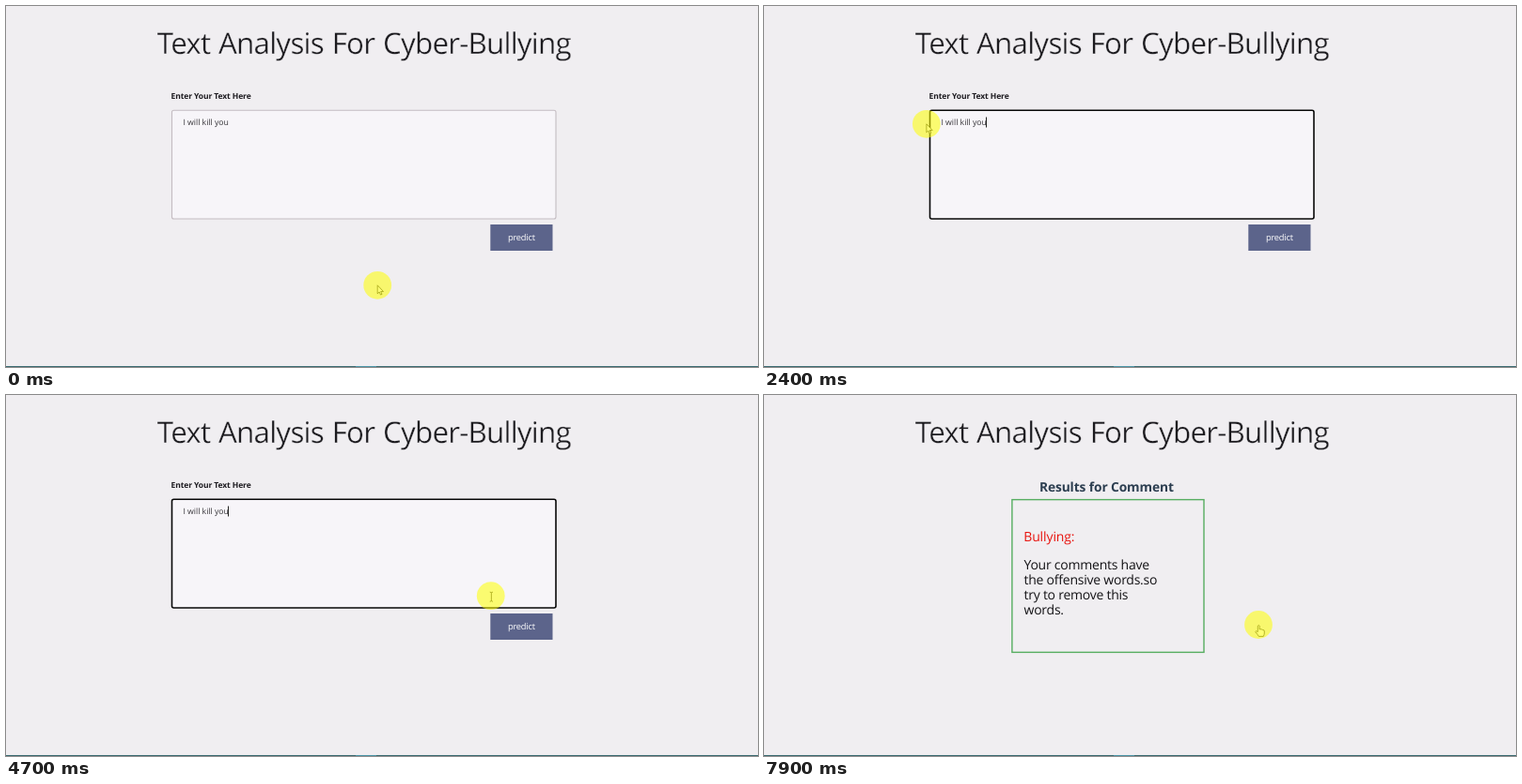
Animation, 800 px wide and 385 px high, one loop 8 s. Source, as an HTML page:

```html
<!DOCTYPE html>
<html lang="en">
<head>
<meta charset="utf-8">
<title>Text analysis form</title>
<style>
  html, body { margin: 0; width: 100%; height: 100%; overflow: hidden; background: #f0eef1; }
  svg { display: block; width: 800px; height: 385px; }
  text { font-family: "Open Sans", "Noto Sans", sans-serif; text-rendering: geometricPrecision; white-space: pre; }
  .title { font-size: 31.4px; letter-spacing: -.8px; word-spacing: 1.4px; fill: #1c1b1f; stroke: #f0eef1; stroke-width: .35; }
  .label { font-size: 8.5px; font-weight: 700; letter-spacing: -.11px; fill: #1d1b20; }
  .entry { font-size: 8.7px; letter-spacing: -.01px; fill: #38363b; }
  .action { font-size: 9.3px; letter-spacing: -.2px; fill: #fff; }
  .status { font-size: 6.8px; letter-spacing: -.07px; fill: #5d6168; }
  .heading { font-size: 13.8px; font-weight: 700; letter-spacing: -.12px; fill: #2c3e50; }
  .body { font-size: 14px; letter-spacing: -.24px; fill: #151417; }
  .bad { fill: #e8140f; letter-spacing: -.12px; }
  .pointer { fill: #fff; stroke: #34332c; stroke-width: .8; stroke-linejoin: round; }
</style>
</head>
<body>
<svg viewBox="0 0 800 385">
  <rect width="800" height="385" fill="#f0eef1"/>
  <text class="title" x="160.8" y="51">Text Analysis For Cyber-Bullying</text>

  <g id="form">
    <text class="label" x="175.6" y="98.8">Enter Your Text Here</text>
    <rect id="area" x="176.5" y="111.3" width="408.5" height="115.7" rx="2" fill="#f7f5f9"/>
    <text class="entry" x="188.4" y="127">I will kill you</text>
    <path id="caret" d="M236.5 118.5V129.5" stroke="#222"/>
    <rect x="515.3" y="233" width="66.2" height="28" fill="#5c648b"/>
    <rect id="ring" x="515.2" y="233" width="66.4" height="28.2" rx="2" fill="none" stroke="#10121c" stroke-width="1.5"/>
    <text class="action" x="533.9" y="250.3">predict</text>
  </g>

  <g id="result">
    <text class="heading" x="292.9" y="103.2">Results for Comment</text>
    <rect x="263.9" y="111.6" width="204.1" height="162.8" fill="none" stroke="#56ad60" stroke-width="1.4"/>
    <text class="body bad" x="276.2" y="155.5">Bullying:</text>
    <text class="body" id="advice"></text>
  </g>

  <rect y="384" width="800" height="1" fill="#3a6a70"/>
  <rect x="372" y="384" width="22" height="1" fill="#4a94a6"/>

  <g id="status">
    <path d="M0 372H264Q266 372 266 374V384H0Z" fill="#dde1e8" stroke="#cdd1d8" stroke-width=".6"/>
    <text class="status" x="2.8" y="381">Waiting for 127.0.0.1...</text>
  </g>

  <g id="mouse">
    <g class="pointer">
      <path id="arrow" d="M0 0V9L2 7.2L3.3 10.2L4.8 9.6L3.5 6.7H6.3Z"/>
      <path id="beam" fill="none" d="M-1 -4Q.6 -4 .6 -3.2Q.6 -4 2.2 -4M.6 -3.2V5.2M-1 6Q.6 6 .6 5.2Q.6 6 2.2 6"/>
      <path id="hand" d="M-.7 1.2Q.3 -.2 1.2 1.2V5Q2.2 4.1 3 5.2Q4 4.4 4.7 5.6Q6.3 5.2 6.3 7V9Q6.3 10.5 5.3 12.4H.3Q-.8 10.3 -3.3 7.6Q-2.8 5.9 -.7 7.6Z"/>
    </g>
    <circle r="14.9" fill="#ff0" fill-opacity=".55"/>
  </g>
</svg>
<script>
const LOOP = 8000, STEP = 100, BLINK = 530;
const FOCUS = 100, CLICK = 5500, LOAD = 5900, DONE = 7200;

const home = { x: 395.2, y: 297.8 };
const glides = [
  { from: 700, to: 1100, x: 404, y: 157 },
  { from: 1300, to: 1700, x: 399, y: 156 },
  { from: 1800, to: 2300, x: 121, y: 125 },
  { from: 2300, to: 2500, x: 184, y: 126 },
  { from: 2600, to: 3000, x: 259, y: 110 },
  { from: 3000, to: 3400, x: 185, y: 113 },
  { from: 3500, to: 4000, x: 170.5, y: 126 },
  { from: 4000, to: 4300, x: 305, y: 150 },
  { from: 4500, to: 4900, x: 561, y: 228 },
  { from: 4900, to: 5400, x: 526, y: 245 }
];

const el = id => document.getElementById(id);
const show = (id, on) => el(id).setAttribute("opacity", +on);
const clamp = k => Math.min(1, Math.max(0, k));
const ramp = (t, from, steps) => clamp((t - from + STEP) / (steps * STEP));
const mix = (a, b, k) => a + (b - a) * k;
const easeOut = k => 1 - (1 - k) ** 2.5;
const within = (x, y, l, t, r, b) => x >= l && x <= r && y >= t && y <= b;

el("advice").innerHTML = ["Your comments have", "the offensive words.so", "try to remove this", "words."]
  .map((line, i) => `<tspan x="276.5" y="${186 + i * 15.9}">${line}</tspan>`).join("");

function position(t) {
  let { x, y } = home;
  for (const g of glides) {
    const k = easeOut(clamp((t - g.from) / (g.to - g.from)));
    x = mix(x, g.x, k);
    y = mix(y, g.y, k);
  }
  return [x, y];
}

function pointer(x, y, t) {
  if (within(x, y, 515, 233, 581, 261)) return "hand";
  if (t < DONE && (within(x, y, 176, 111, 585, 227) || within(x, y, 176, 92, 260, 100))) return "beam";
  return "arrow";
}

function draw(t) {
  const focus = ramp(t, FOCUS, 2) - ramp(t, CLICK, 3);
  const shade = [196, 188, 194].map(c => Math.round(mix(c, 8, focus)));
  el("area").setAttribute("stroke", `rgb(${shade})`);
  el("area").setAttribute("stroke-width", mix(1.1, 1.6, focus));

  const blinks = Math.floor((t - 500) / BLINK);
  show("caret", t >= FOCUS && t < CLICK && blinks % 2 !== 0);
  show("ring", ramp(t, CLICK, 2));
  show("form", t < DONE);
  show("result", t >= DONE);
  show("status", ramp(t, LOAD, 3) - ramp(t, DONE, 3));

  const [x, y] = position(t), kind = pointer(x, y, t);
  el("mouse").setAttribute("transform", `translate(${x} ${y})`);
  for (const id of ["arrow", "beam", "hand"]) show(id, id === kind);
}

// The screen refreshes in steps of 100 ms.
let start;
function tick(now) {
  start ??= now;
  draw(Math.floor((now - start) % LOOP / STEP) * STEP);
  requestAnimationFrame(tick);
}
draw(0);
requestAnimationFrame(tick);
</script>
</body>
</html>
```
